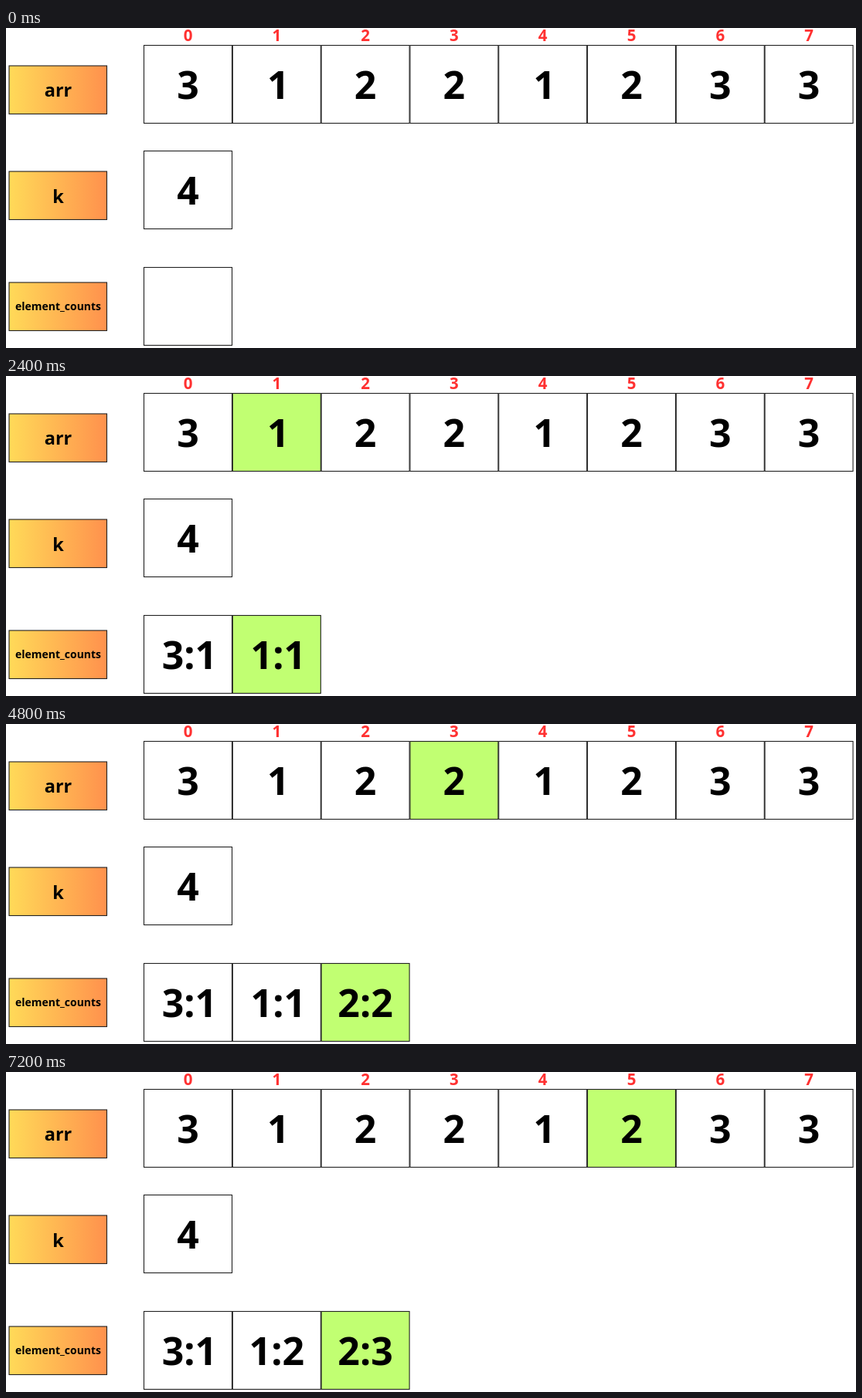
Animation, 1100 px wide and 415 px high, one loop 8000 ms. Source, as an HTML page:

```html
<!DOCTYPE html>
<html lang="en">
<head>
<meta charset="utf-8">
<title>Counting elements</title>
<style>
  html, body { margin: 0; width: 100%; height: 100%; overflow: hidden; background: #fff; }
  svg { display: block; width: 1100px; height: 415px; }
  text { font-family: "Noto Sans", "Open Sans", sans-serif; font-weight: 700; text-anchor: middle; }
  rect { stroke: #222; stroke-width: 1.1; }
</style>
</head>
<body>
<svg viewBox="0 0 1100 415">
  <defs>
    <linearGradient id="amber">
      <stop offset="0" stop-color="#ffda58"/>
      <stop offset="1" stop-color="#ff914d"/>
    </linearGradient>
  </defs>
  <g id="fixed"></g>
  <g id="cells"></g>
</svg>
<script>
const arr = [3, 1, 2, 2, 1, 2, 3, 3];
const k = 4;
const LOOP = 8000, STEP = 1200;
const LEFT = 178.5, PITCH = 114.8, CELL_W = 114, CELL_H = 101;
const ROW = { arr: 22.5, k: 159.5, counts: 310.5 };

const rect = (x, y, w, h, fill) =>
  `<rect x="${x}" y="${y}" width="${w}" height="${h}" fill="${fill}"/>`;

const text = (x, y, size, str, fill = '#000') =>
  `<text x="${x}" y="${y}" font-size="${size}" fill="${fill}">${str}</text>`;

const center = i => LEFT + PITCH * i + CELL_W / 2;

function cell(i, top, value, active) {
  const str = String(value);
  const nudge = str.endsWith('1') ? 2 : 0; // the digit 1 sits left in its advance
  return rect(LEFT + PITCH * i, top, CELL_W, CELL_H, active ? '#c1ff72' : '#fff') +
    text(center(i) + nudge, top + 69.8, 50, str);
}

const label = (top, str, size, baseline) =>
  rect(4, top, 126.5, 62.5, 'url(#amber)') + text(67.5, baseline, size, str);

document.getElementById('fixed').innerHTML =
  label(49, 'arr', 23.5, 89) +
  label(186, 'k', 23.5, 226.5) +
  label(330, 'element_counts', 14, 366) +
  arr.map((_, i) => text(center(i), 17, 20.5, i, '#ff3131')).join('') +
  cell(0, ROW.k, k, false);

function draw(step) {
  const counts = new Map();
  for (const v of arr.slice(0, step)) counts.set(v, (counts.get(v) || 0) + 1);
  const current = arr[step - 1];
  const tallies = [...counts].map(([v, n], i) =>
    cell(i, ROW.counts, `${v}:${n}`, v === current));

  document.getElementById('cells').innerHTML =
    arr.map((v, i) => cell(i, ROW.arr, v, i === step - 1)).join('') +
    (tallies.join('') || cell(0, ROW.counts, '', false));
}

let shown = -1;
function tick() {
  const step = Math.floor(performance.now() % LOOP / STEP);
  if (step !== shown) draw(shown = step);
  requestAnimationFrame(tick);
}
tick();
</script>
</body>
</html>
```
